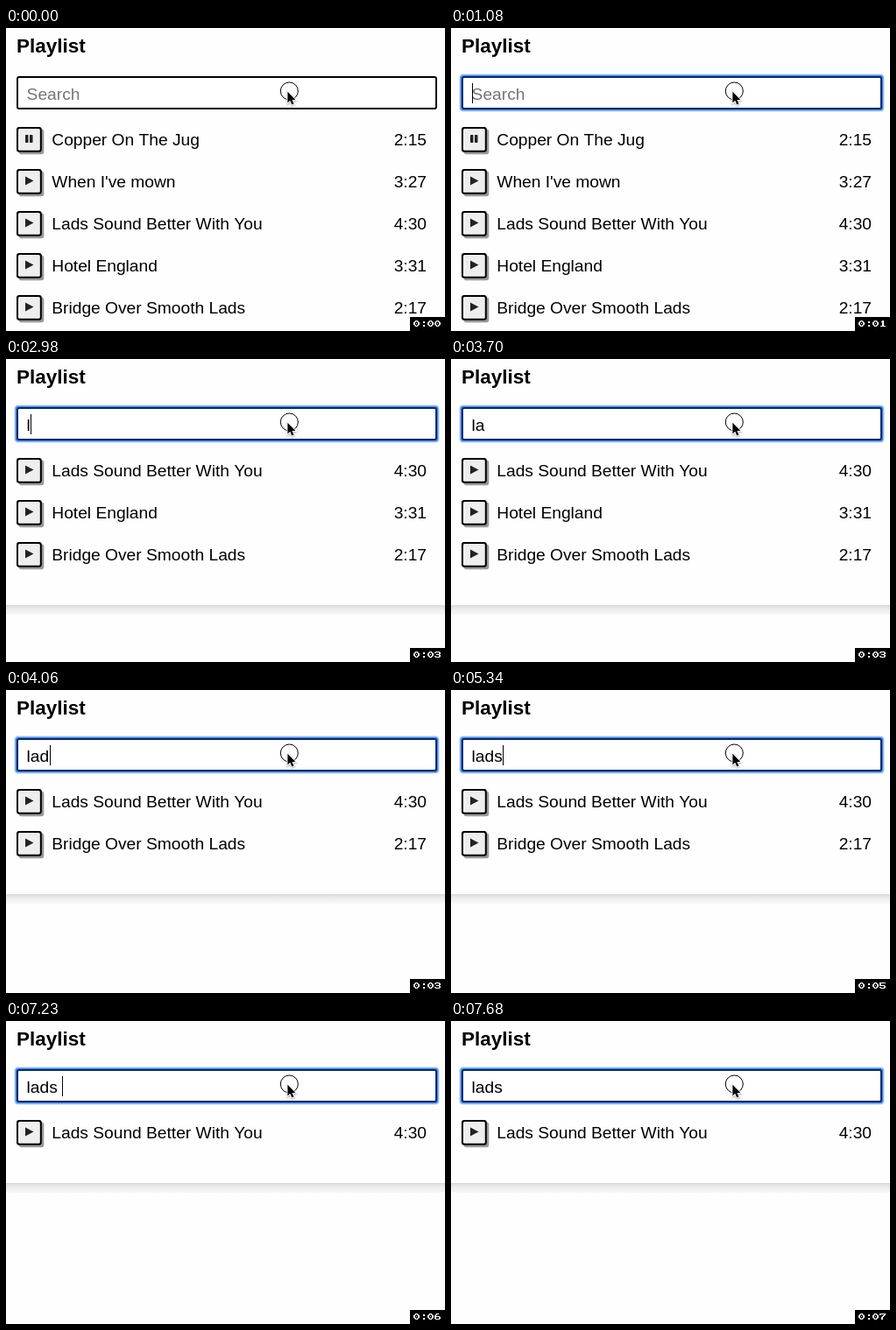
These frames come from a looping animation (501x346 px, 8000 ms). An HTML page with a canvas:

```html
<!DOCTYPE html>
<html lang="en">
<head>
<meta charset="utf-8">
<title>Playlist search</title>
<style>
  html, body { margin: 0; width: 100%; height: 100%; overflow: hidden; background: #fefefe; }
  canvas { display: block; }
</style>
</head>
<body>
<canvas id="stage" width="501" height="346"></canvas>
<script>
const ctx = document.getElementById('stage').getContext('2d');
const LOOP = 8000;
const FONT = '"Liberation Sans", Arial, sans-serif';

const tracks = [
  { title: 'Copper On The Jug', time: '2:15', playing: true },
  { title: "When I've mown", time: '3:27' },
  { title: 'Lads Sound Better With You', time: '4:30' },
  { title: 'Hotel England', time: '3:31' },
  { title: 'Bridge Over Smooth Lads', time: '2:17' }
];

// Each entry: start time in ms, value from then on.
const typing = [[0, ''], [2980, 'l'], [3340, 'la'], [4060, 'lad'], [5340, 'lads'], [7230, 'lads ']];
const caretStates = [
  [0, false], [1080, true], [1800, false], [2260, true], [2620, false], [2980, true],
  [3700, false], [4060, true], [4880, false], [5340, true], [5690, false], [6050, true],
  [6870, false], [7230, true], [7680, false]
];
const seconds = [[0, 0], [720, 1], [1900, 2], [2980, 3], [4160, 4], [4980, 5], [6150, 6], [7330, 7]];
const FOCUS_AT = 1080;
const caretX = [24, 28, 38, 50, 59, 64];

// Outlines of the clock characters on an 8 by 8 cell.
const glyphs = {
  '0': 'M2 0h3v1h1v1h1v3h-1v1h-1v1h-3v-1h-1v-1h-1v-3h1v-1h1zM3 1h1v1h1v3h-1v1h-1v-1h-1v-3h1zM3 3h1v1h-1z',
  '1': 'M3 0h2v6h2v1h-6v-1h2v-4h-1v-1h1z',
  '2': 'M1 0h5v1h1v2h-1v1h-2v1h-1v1h2v-1h2v2h-7v-1h1v-1h1v-1h1v-1h2v-2h-3v1h-2v-1h1z',
  '3': 'M1 0h5v1h1v2h-1v1h1v2h-1v1h-5v-1h-1v-1h2v1h3v-2h-3v-1h3v-2h-3v1h-2v-1h1z',
  '4': 'M3 0h3v4h1v1h-1v1h1v1h-4v-1h1v-1h-4v-2h1v-1h1v-1h1zM3 2h1v2h-2v-1h1z',
  '5': 'M0 0h7v1h-5v2h4v1h1v2h-1v1h-5v-1h-1v-1h2v1h3v-2h-5z',
  '6': 'M2 0h3v1h-2v1h-1v1h4v1h1v2h-1v1h-5v-1h-1v-4h1v-1h1zM2 4h3v2h-3z',
  '7': 'M0 0h7v2h-1v1h-1v1h-1v3h-2v-3h1v-1h1v-1h1v-1h-3v1h-2z',
  ':': 'M3 1h2v2h-2zM3 5h2v2h-2z'
};
for (const key in glyphs) glyphs[key] = new Path2D(glyphs[key]);

const arrow = new Path2D('M321.4 72.8V85.4L324.2 82.8L326.3 87.6L328.5 86.6L326.4 82H330.4Z');

function valueAt(steps, t) {
  let value;
  for (const [start, v] of steps) if (t >= start) value = v;
  return value;
}

function text(str, x, y, { size = 19.2, weight = 400, color = '#000', align = 'left' } = {}) {
  ctx.font = `${weight} ${size}px ${FONT}`;
  ctx.fillStyle = color;
  ctx.textAlign = align;
  ctx.fillText(str, x, y);
}

function box(x, y, w, h, r, color) {
  ctx.fillStyle = color;
  ctx.beginPath();
  ctx.roundRect(x, y, w, h, r);
  ctx.fill();
}

function drawPanel(rows) {
  const bottom = 137 + 48 * rows;
  ctx.fillStyle = '#fefefe';
  ctx.fillRect(0, 0, 501, 346);
  const shade = ctx.createLinearGradient(0, bottom, 0, bottom + 11);
  shade.addColorStop(0, '#d9d9d9');
  shade.addColorStop(0.2, '#e4e4e4');
  shade.addColorStop(0.55, '#efefef');
  shade.addColorStop(1, '#f8f8f8');
  ctx.fillStyle = shade;
  ctx.fillRect(0, bottom, 501, 11);
}

function drawSearch(query, focused, caret) {
  if (focused) {
    box(9, 52, 486, 44, 5, '#dbe8fd');
    box(10, 53, 484, 42, 4, '#8db8f8');
    box(11, 54, 482, 40, 3, '#4388ee');
  }
  box(12, 55, 480, 38, 3, focused ? '#062a68' : '#000');
  box(14, 57, 476, 34, 1, '#fff');
  if (query) text(query, 23.6, 82);
  else text('Search', 23.6, 82, { color: '#757575' });
  if (caret) {
    ctx.fillStyle = '#000';
    ctx.fillRect(caretX[query.length], 63, 1, 23);
  }
}

function drawTrack(track, row) {
  const y = 127 + 48 * row;
  box(14.5, y - 11.5, 28.8, 28.8, 3, '#999');
  box(12, y - 14, 28.8, 28.8, 3, '#000');
  box(14, y - 12, 24.8, 24.8, 1.5, '#eee');
  ctx.fillStyle = '#222';
  if (track.playing) {
    box(22, y - 5, 3.5, 9, 0.7, '#222');
    box(27, y - 5, 3.5, 9, 0.7, '#222');
  } else {
    ctx.beginPath();
    ctx.moveTo(22, y - 5.5);
    ctx.lineTo(31.5, y - 0.5);
    ctx.lineTo(22, y + 4.5);
    ctx.fill();
  }
  text(track.title, 52.3, y + 7);
  text(track.time, 480, y + 7, { align: 'right' });
}

function drawPointer() {
  ctx.strokeStyle = '#000';
  ctx.lineWidth = 1;
  ctx.beginPath();
  ctx.arc(323.3, 72, 10, 0, Math.PI * 2);
  ctx.stroke();
  ctx.save();
  ctx.shadowColor = 'rgba(0,0,0,.35)';
  ctx.shadowBlur = 2;
  ctx.shadowOffsetY = 1;
  ctx.strokeStyle = '#fff';
  ctx.lineWidth = 2;
  ctx.stroke(arrow);
  ctx.restore();
  ctx.fillStyle = '#000';
  ctx.fill(arrow);
}

function drawClock(sec) {
  ctx.fillStyle = '#000';
  ctx.fillRect(461, 330, 40, 16);
  ctx.fillStyle = '#fff';
  [...`0:0${sec}`].forEach((char, i) => {
    ctx.save();
    ctx.translate(465 + 8 * i, 334);
    ctx.fill(glyphs[char], 'evenodd');
    ctx.restore();
  });
}

function draw(t) {
  const query = valueAt(typing, t);
  const matches = tracks.filter(track => track.title.toLowerCase().includes(query));
  drawPanel(matches.length);
  text('Playlist', 12, 28, { size: 22.46, weight: 700 });
  drawSearch(query, t >= FOCUS_AT, valueAt(caretStates, t));
  matches.forEach(drawTrack);
  drawPointer();
  drawClock(valueAt(seconds, t));
}

const begin = performance.now();
function tick() {
  draw((performance.now() - begin) % LOOP);
  requestAnimationFrame(tick);
}
tick();
</script>
</body>
</html>
```
